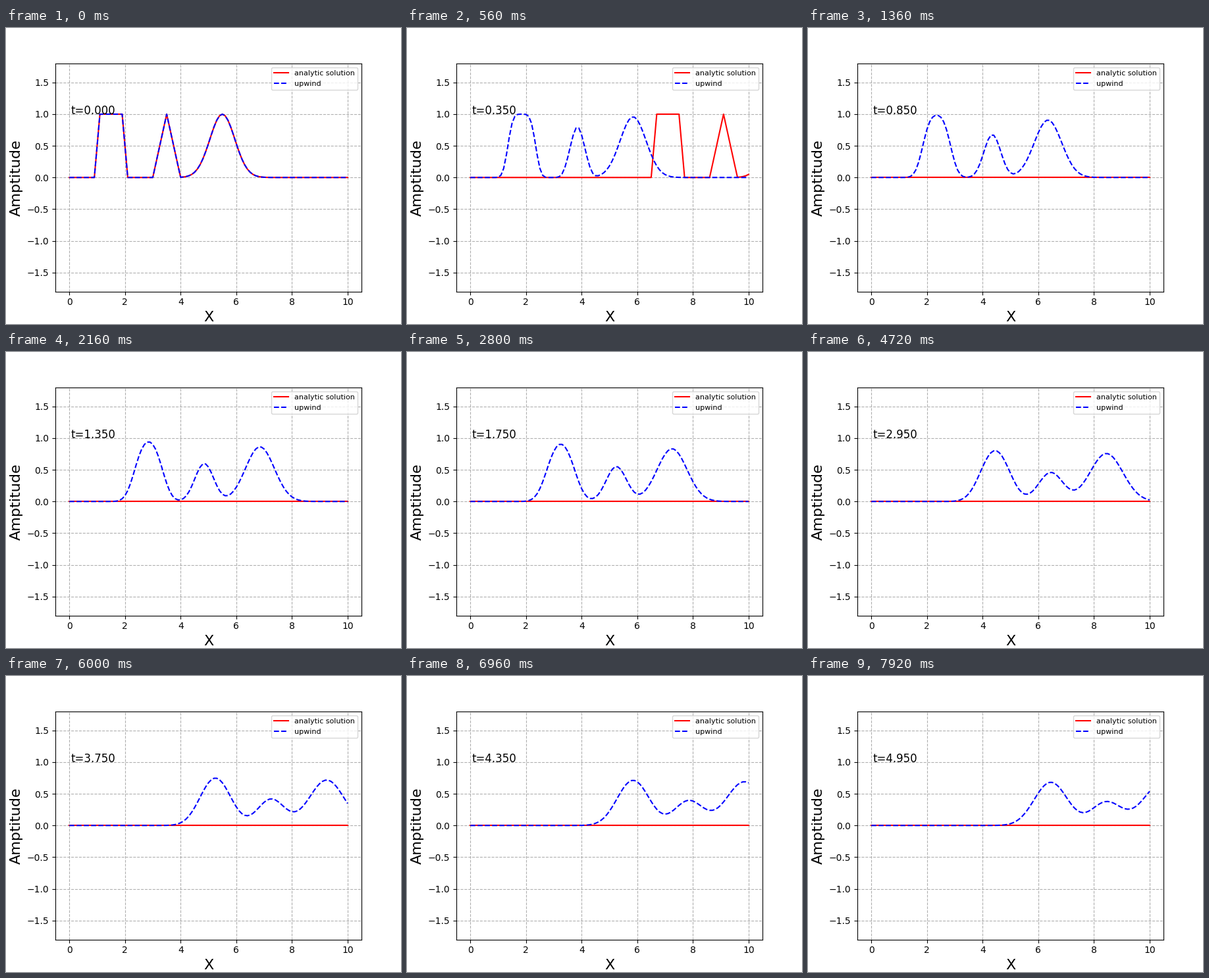
Write a matplotlib script that moves like this. It is 600 px wide and 450 px high and loops after 8 s.

```python
import numpy as np
import matplotlib.pyplot as plt
from matplotlib.animation import FuncAnimation

FRAMES = 100
INTERVAL = 80
DT = 0.05
COURANT = 0.5
SHIFT_PER_FRAME = 0.8

x = np.linspace(0, 10, 101)


def profile(x):
    """Box, triangle and Gaussian pulses side by side."""
    x = np.round(x, 6)
    box = np.heaviside(x - 1, 0.5) - np.heaviside(x - 2, 0.5)
    triangle = np.clip(1 - 2 * np.abs(x - 3.5), 0, None)
    bell = np.where(x >= 4, np.exp(-2.5 * (x - 5.5) ** 2), 0)
    return box + triangle + bell


def upwind_history():
    history = [profile(x)]
    for _ in range(FRAMES - 1):
        u = history[-1].copy()
        u[1:] -= COURANT * np.diff(history[-1])
        history.append(u)
    return history


history = upwind_history()

fig, ax = plt.subplots(figsize=(6, 4.5), dpi=100)
exact, = ax.plot(x, history[0], "r-", label="analytic solution")
upwind, = ax.plot(x, history[0], "b--", label="upwind")
clock = ax.text(0.05, 1, "t=0.000", fontsize=12)
ax.set_xlim(-0.5, 10.5)
ax.set_ylim(-1.8, 1.8)
ax.set_xlabel("X", fontsize=16)
ax.set_ylabel("Amptitude", fontsize=16)
ax.grid(linestyle="--")
ax.legend(loc="upper right", fontsize=8)


def update(i):
    exact.set_ydata(profile(x - SHIFT_PER_FRAME * i))
    upwind.set_ydata(history[i])
    clock.set_text(f"t={i * DT:.3f}")
    return exact, upwind, clock


anim = FuncAnimation(fig, update, frames=FRAMES, interval=INTERVAL,
                     repeat=True, repeat_delay=0)
plt.show()
```
